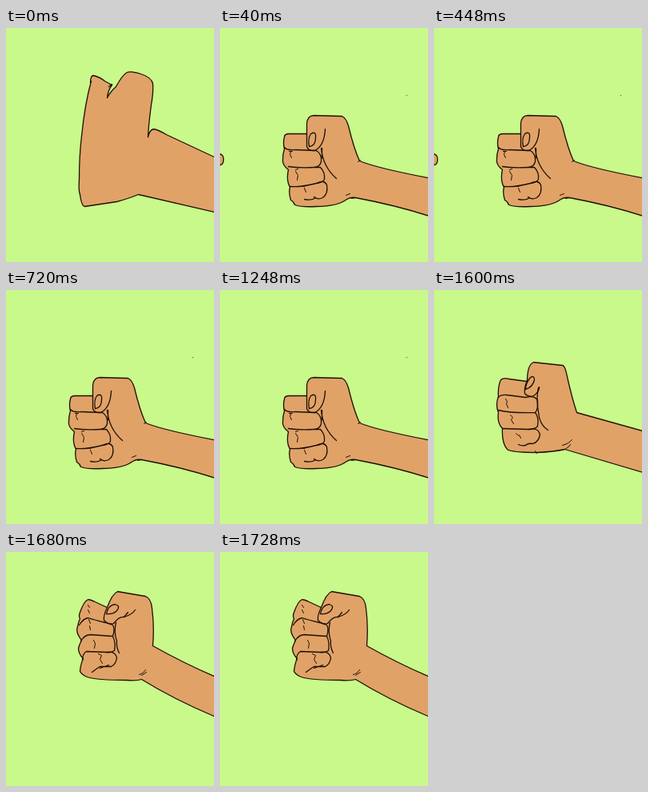
Recreate the animation shown at these times as an HTML page. Size 260x293 px, loop 1760 ms.

```html
<!DOCTYPE html>
<html lang="en">
<head>
<meta charset="utf-8">
<title>Fist</title>
<style>
html, body { margin: 0; width: 100%; height: 100%; overflow: hidden; background: #c8f98a; }
svg { display: block; width: 100%; height: 100%; }
path { stroke: #1c1006; stroke-width: 1.3; stroke-linecap: round; stroke-linejoin: round; fill: none; }
.skin { fill: #e1a268; }
.fine path { stroke-width: 1; }
</style>
</head>
<body>
<svg viewBox="-.5 -.5 260 293">
  <g id="open">
    <path class="skin" d="M106 66L105 68Q105 59 109 59Q117 61 123 66L132 71Q127 77 126 87Q130 79 137 73Q145 58 151 55Q156 53 168 57Q181 61 183 69Q184 79 181 96Q178 118 177 136Q179 127 184 126Q190 127 200 133L264 163V231L165 208Q150 214 138 217L98 223Q94 223 92 208Q90 203 91 190Q91 160 94 135Q98 95 106 66Z"/>
    <path d="M128 73L132 70"/>
  </g>

  <g id="level">
    <path class="skin" d="M108 132V119Q109 109 117 109L152 110Q157 112 160 122Q167 151 174 166Q196 175 264 188V236Q222 222 169 212Q163 211 158 214Q146 223 120 223Q101 224 93 221Q92 217 88 215Q85 205 87 199Q82 190 85 177Q77 171 78 164Q78 157 80 151Q78 143 80 136Q80 132 86 132Z"/>
    <path d="M80 149Q83 153 94 152L120 153Q127 157 126 167Q124 174 117 174Q98 175 85 173"/>
    <path d="M118 174H125Q131 180 130 189Q128 193 120 194Q101 199 87 198"/>
    <path d="M120 194Q130 189 133 196Q135 207 128 212Q121 215 117 211M105 214Q114 216 119 212"/>
    <path d="M108 132V148Q110 154 118 153Q130 147 131 126"/>
    <path d="M111 148Q109 138 113 132Q120 128 119 137Q119 147 111 148Z"/>
    <path d="M126 150Q128 173 145 188M127 150V162"/>
    <g class="fine">
      <path d="M86 154H90M88 154L87 158L89 162M94 177L97 176M94 179L97 184L96 190M104 198L107 197M105 200L107 205"/>
      <path d="M157 209L162 207M164 213L170 212M172 167L175 165"/>
    </g>
    <circle cx="233" cy="84" r=".7" fill="#587238"/>
  </g>

  <path id="tip" class="skin" d="M-3 157Q4 157 4 164Q4 170 0 171H-3Z"/>

  <g id="rise">
    <path class="skin" d="M116 114Q116 93 124 90L161 94Q164 97 166 108Q172 135 178 153L264 177V229L163 199Q150 202 128 203Q96 203 91 199Q84 191 85 173Q78 165 80 153Q76 143 80 133Q79 121 83 112Q86 109 94 111Z"/>
    <path d="M80 134Q82 130 91 131L114 134Q126 131 129 138Q130 149 126 153Q98 154 80 150"/>
    <path d="M126 153Q131 159 129 170Q126 174 118 174L85 173"/>
    <path d="M118 174Q130 171 132 181Q130 190 123 192Q117 191 114 194Q109 195 105 193"/>
    <path d="M116 113Q112 122 113 129Q117 134 124 132Q131 127 131 121"/>
    <path d="M114 124Q114 116 120 109Q125 106 125 112Q123 121 114 124Z"/>
    <path d="M130 122Q127 136 130 152Q131 168 142 175"/>
    <g class="fine">
      <path d="M89 136L91 139L90 142L92 147M95 156L98 159L96 162L99 167M102 179L105 182M106 181L108 185"/>
      <path d="M160 194Q168 192 172 187M163 199Q168 197 170 193M126 201L128 204"/>
    </g>
  </g>

  <g id="high">
    <path class="skin" d="M126 69Q132 52 139 49L174 55Q181 58 182 70Q185 92 183 117Q222 139 264 157V207Q211 185 169 159Q163 161 150 160Q113 160 101 156Q94 153 92 149Q93 139 96 133Q90 127 90 120Q91 116 94 110Q86 100 89 93Q90 87 92 83Q90 80 92 75Q97 61 102 59Q105 59 111 62Z"/>
    <path d="M91 91Q96 83 102 82Q108 84 124 88L133 91Q136 96 133 105L105 103Q98 103 93 111"/>
    <path d="M133 105Q137 113 135 123Q131 126 125 125L100 124Q95 127 95 135"/>
    <path d="M125 125Q136 123 138 132Q137 140 131 143L117 143Q112 146 107 150M117 145L128 141"/>
    <path d="M126 69Q121 79 122 85Q128 91 134 89Q141 80 147 81Q157 78 161 72"/>
    <path d="M125 77Q127 66 136 65Q143 67 138 73Q133 78 125 77Z"/>
    <path d="M147 81L152 75M137 88Q134 99 138 111Q137 118 141 126"/>
    <g class="fine">
      <path d="M102 66L104 69M102 72L104 76M103 84L105 89M104 92L105 97M109 110L111 114L110 120M115 127L119 129L117 134L120 139"/>
      <path d="M166 153Q171 152 174 147M169 154L175 150"/>
    </g>
  </g>
</svg>
<script>
const LOOP = 1760;
const spans = {
  open: [0, 40],
  level: [40, 1600],
  tip: [40, 720],
  rise: [1600, 1680],
  high: [1680, LOOP]
};
const parts = Object.entries(spans).map(([id, span]) => [document.getElementById(id), span]);
const start = performance.now();

function draw(now) {
  const t = Math.max(0, now - start) % LOOP;
  for (const [el, [from, to]] of parts) {
    el.style.display = t >= from && t < to ? "" : "none";
  }
  requestAnimationFrame(draw);
}
draw(start);
</script>
</body>
</html>
```
